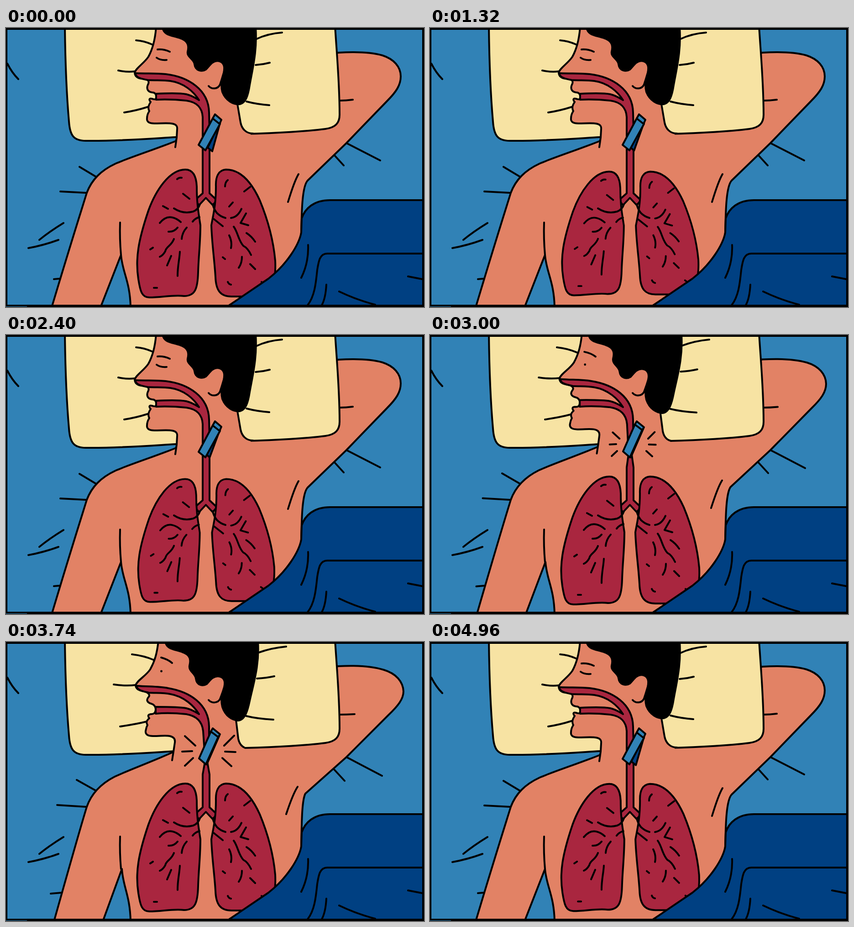
These frames come from a looping animation (916x611 px, 5080 ms). An HTML page:

```html
<!DOCTYPE html>
<html lang="en">
<head>
<meta charset="utf-8">
<title>Breathing in sleep</title>
<style>
html, body { margin: 0; width: 100%; height: 100%; overflow: hidden; background: #000; }
svg { display: block; width: 916px; height: 611px; }
.ink { fill: none; stroke: #000; stroke-width: 4; stroke-linecap: round; stroke-linejoin: round; }
.skin { fill: #e28265; }
.pillow { fill: #f7e3a3; }
.red { fill: #a9263f; }
.bed { fill: #3182b6; }
.navy { fill: #004082; }
.hair { fill: #000; }
.bare { stroke: none; }
</style>
</head>
<body>
<svg viewBox="0 0 916 611">
  <rect class="bed" width="916" height="611"/>
  <path class="ink" d="M126 427Q95 446 73 464M115 464Q82 476 49 482M3 78Q13 98 27 112"/>
  <g class="ink">
    <path id="bedLines"/>
    <path id="body" class="skin"/>
    <path id="armLines"/>
    <path class="pillow" d="M129 -5C130 90 134 160 138 205C140 235 148 247 175 247C245 248 320 242 372 239L524 232C600 230 660 226 700 221C722 218 731 208 731 190C731 120 725 60 721 -5"/>
    <path id="creases"/>
    <path id="headFill" class="skin bare"/>
    <path id="headLine"/>
    <path id="nape"/>
    <path id="airway" class="red"/>
    <path id="hair" class="hair"/>
    <path id="ear" class="skin"/>
    <path id="brow"/>
    <path id="lid" d="M330 65Q338 71 352 70"/>
    <circle id="eye" class="hair bare" r="2.4"/>
    <path id="backLeg" class="navy"/>
    <path id="frontLeg" class="bed"/>
    <path id="cap" class="bed"/>
    <path id="rays"/>
    <path d="M250 426C249 455 250 475 252 497"/>
    <g id="lungL">
      <path class="red" d="M393 310C410 310 417 325 418 347C418 385 422 405 426 432C426 470 422 500 421 535C420 572 414 587 390 587C366 584 342 590 314 590C297 590 294 575 290 550C283 505 290 465 312 400C328 356 358 310 393 310Z"/>
      <path d="M375 331Q379 327 385 328M388 363L402 374M344 390L355 396M337 427Q350 411 365 415Q374 417 383 425M409 424Q414 417 424 414M356 446Q368 447 376 437M385 462Q386 448 396 437M368 462C362 478 351 478 349 489Q344 498 337 501M316 485L322 481M362 499L353 520M381 490C380 508 376 520 376 543M324 569L331 569"/>
    </g>
    <g id="lungR">
      <path class="red" d="M482 310C466 311 459 325 460 347C460 385 455 405 450 432C451 470 457 510 459 545C460 575 470 588 494 588L540 588C585 580 592 555 590 510C586 465 573 418 556 377C540 342 517 310 482 310Z"/>
      <path d="M486 333Q480 338 480 347M522 358L535 348M489 391L497 382M455 418L475 434M493 416Q508 414 516 396M526 406L514 427L531 432M499 435C508 447 509 465 520 477Q530 482 537 497M527 449Q538 456 546 468M489 454Q496 468 493 482M517 501Q517 515 510 525M475 502L480 506M535 517L546 528M486 556Q488 561 493 562M560 556L564 559"/>
    </g>
    <path d="M368 395Q388 408 410 402Q421 398 425 386M453 386Q455 396 462 405Q470 413 481 416"/>
    <path class="navy" d="M488 608L575 549C615 518 642 475 647 448L648 417C655 395 675 377 710 377L925 377L925 620L488 620Z"/>
    <path d="M915 494L704 494C687 494 685 512 682 530C679 560 676 588 661 607M662 475C663 500 658 525 647 547M702 562C701 580 697 598 692 607M730 577Q765 594 809 606M881 544L912 550"/>
  </g>
  <path d="M0 0H916V4H0ZM0 0H3V611H0ZM912 0H916V611H912ZM0 606H916V611H0Z"/>
  <path class="bed" d="M0 610H46V611H0Z"/>
</svg>
<script>
const $ = id => document.getElementById(id);

// blends two paths that share one structure
const mix = (a, b, p) => {
  const to = b.match(/-?\d+(\.\d+)?/g);
  let i = 0;
  return a.replace(/-?\d+(\.\d+)?/g, n => +(+n + (to[i++] - n) * p).toFixed(2));
};

const track = keys => t => {
  if (t <= keys[0][0]) return keys[0][1];
  for (let i = 1; i < keys.length; i++) {
    const [t0, v0] = keys[i - 1], [t1, v1] = keys[i];
    if (t < t1) return v0 + (v1 - v0) * (t - t0) / (t1 - t0);
  }
  return keys[keys.length - 1][1];
};

const faceA = 'M329 -3C327 25 322 45 312 63C302 78 284 88 282 98C283 108 290 111 301 111C311 111 315 117 311 124C307 133 311 140 320 141C326 141 329 145 329 150C329 158 326 157 320 155C313 153 313 158 317 162C313 168 310 174 314 182C310 188 309 193 309 198C308 206 315 209 325 209C340 209 352 208 361 209C372 210 376 214 375 222L374 240L371 261';
const faceB = 'M334 -3C331 25 326 42 316 60C306 75 287 84 284 95C285 104 292 106 301 108C312 110 317 116 312 121C306 128 311 133 318 135C325 137 328 142 328 148C327 156 324 158 317 158C310 159 311 163 314 167C309 171 306 175 310 182C307 187 307 191 306 195C305 203 312 206 322 206C340 206 350 204 359 206C368 208 371 213 370 220L367 240L364 259';

const headMoves = {
  headLine: [faceA, faceB],
  headFill: [
    faceA + 'L400 300L540 262L536 231C526 230 517 222 514 207L508 165L480 60L470 -3Z',
    faceB + 'L400 300L530 262L524 234C517 230 512 222 509 212L504 168L480 60L470 -3Z'],
  nape: [
    'M507 166L514 207C517 222 527 231 541 231',
    'M504 170L509 212C511 222 516 229 524 232'],
  airway: [
    'M285 99C310 100 330 99 350 101C400 107 444 135 445 185L446 225L446 262L446 290L446 362L462 377L453 388L438 372L423 388L414 377L431 362L431 290L431 262L431 225L431 195C430 175 418 162 395 159C375 157 350 156 329 157L329 144C350 143 380 142 395 145C408 148 418 155 423 158C412 140 390 120 360 116C345 114 330 115 311 114C300 112 286 110 283 100Z',
    'M287 96C315 98 335 97 355 101C402 109 444 135 445 185L445 215L441 262L446 290L446 362L462 377L453 388L438 372L423 388L414 377L431 362L431 290L436 262L434 225L432 195C430 175 418 162 395 158C375 156 350 155 328 157L328 142C350 142 380 142 395 145C408 148 418 155 423 158C412 140 390 119 360 114C345 111 330 112 313 111C301 108 288 106 286 97Z'],
  hair: [
    'M343 -3C344 17 365 16 381 22C400 28 401 40 398 52C396 64 412 68 413 79C415 95 430 96 438 91C446 84 450 73 463 72C478 73 480 85 477 98C471 115 471 128 474 140C482 160 498 167 510 167C526 166 531 145 534 125C540 90 551 50 547 -3Z',
    'M349 -3C350 17 371 16 386 22C405 28 405 40 402 52C400 64 415 69 416 80C418 96 432 97 440 92C447 85 451 76 464 75C479 76 481 87 478 99C471 117 471 130 474 142C481 163 496 171 508 172C524 172 530 148 534 129C542 92 556 50 552 -3Z'],
  ear: [
    'M438 91C446 84 450 73 463 72C478 73 480 85 477 98C473 112 471 118 469 124C464 134 451 135 444 127',
    'M440 92C447 85 451 76 464 75C479 76 481 87 478 99C474 113 471 119 469 125C464 134 451 135 444 127'],
  brow: ['M332 47Q346 46 359 52', 'M340 34Q355 38 364 46'],
  creases: [
    'M285 27Q302 28 320 36M246 93Q265 97 282 95M259 185Q285 181 310 173M549 24Q575 12 605 10M547 81Q563 80 578 76M527 161Q550 167 577 169',
    'M276 27Q302 30 323 39M236 93Q263 97 285 94M250 185Q285 180 309 174M554 23Q582 13 614 10M550 80Q570 79 588 75M526 162Q550 168 586 170']
};

const armMoves = {
  body: [
    'M371 248C320 268 270 284 240 297C208 312 188 332 177 361C164 403 148 452 100 612L207 612L252 497C255 535 272 555 273 612L640 612L647 445C648 400 649 347 661 334L746 252L835 160C855 140 865 125 865 106C865 85 850 68 825 60C800 53 765 52 728 54L600 100L420 200Z',
    'M364 242C320 262 270 280 238 295C207 311 187 332 177 361C164 403 150 452 105 612L212 612L254 497C256 535 272 555 273 612L640 612L647 445C648 400 648 347 656 332L746 252L838 160C859 140 871 125 871 108C870 87 855 69 828 61C802 53 765 51 728 53L600 100L420 200Z'],
  bedLines: [
    'M161 304L196 325M119 358L176 361M105 550L117 549M746 252L820 290M720 279L740 301',
    'M155 302L196 325M112 357L176 361M98 551L122 549M746 252L824 293M718 278L742 304'],
  armLines: [
    'M731 159Q745 159 760 157M641 320Q632 335 618 381',
    'M731 159Q746 159 764 158M639 317Q629 332 614 377']
};

const clipMoves = {
  backLeg: ['M470 204L452 270L442 262Z', 'M468 204L440 268L436 262Z'],
  frontLeg: ['M453 198L469 210L437 268L422 256Z', 'M449 196L465 208L438 268L423 255Z'],
  cap: ['M458 189L472 201L468 210L453 198Z', 'M453 189L469 202L465 208L449 196Z']
};

const raysFrom = 'M416 227L416 227M408 239L408 239M410 254L410 254M478 227L478 227M479 239L479 239M474 254L474 254';
const raysTo = 'M392 206L415 227M386 240L408 239M392 271L410 254M500 205L478 227M503 241L480 240M494 272L474 254';

const head = track([[2760, 0], [3000, .78], [3740, 1], [4040, 1], [4360, 0]]);
const arms = track([[2760, 0], [3000, .5], [3740, 1], [4040, 1], [4360, 0]]);
const clip = track([[2760, 0], [3000, 1], [4040, 1], [4360, 0]]);
const rays = track([[2760, 0], [3000, .65], [3740, 1]]);

// the picture holds for 120 ms, or 100 ms while awake
const hold = t => {
  const [from, len] = t < 3240 ? [0, 120] : t < 4240 ? [3240, 100] : [4240, 120];
  return from + Math.floor((t - from) / len) * len;
};

const breath = t => {
  if (t >= 2880 && t < 4140) return 0;
  const phase = t < 2880 ? t : t - 4120;
  return (1 - Math.cos(phase / 960 * 2 * Math.PI)) / 2;
};

const morph = (moves, p) => {
  for (const id in moves) $(id).setAttribute('d', mix(...moves[id], p));
};

const show = (id, on) => $(id).setAttribute('visibility', on ? 'visible' : 'hidden');

const swell = (id, x, y, b) =>
  $(id).setAttribute('transform', `translate(${x} ${y}) scale(${1 - .026 * b} ${1 - .038 * b}) translate(${-x} ${-y})`);

let last = -1;
function draw() {
  const t = hold(performance.now() % 5080);
  if (t !== last) {
    last = t;
    const h = head(t), b = breath(t);
    const open = t >= 2880 && t < 4960;
    morph(headMoves, h);
    morph(armMoves, arms(t));
    morph(clipMoves, clip(t));
    $('backLeg').setAttribute('transform', `rotate(${5 * b * (1 - clip(t))} 470 204)`);
    swell('lungL', 372, 450, b);
    swell('lungR', 505, 450, b);
    show('lid', !open);
    show('eye', open);
    $('eye').setAttribute('cx', 337 + 3.5 * h);
    $('eye').setAttribute('cy', 67.5 - 3.5 * h);
    show('rays', t >= 2880 && t < 4140);
    $('rays').setAttribute('d', mix(raysFrom, raysTo, rays(t)));
  }
  requestAnimationFrame(draw);
}
draw();
</script>
</body>
</html>
```
